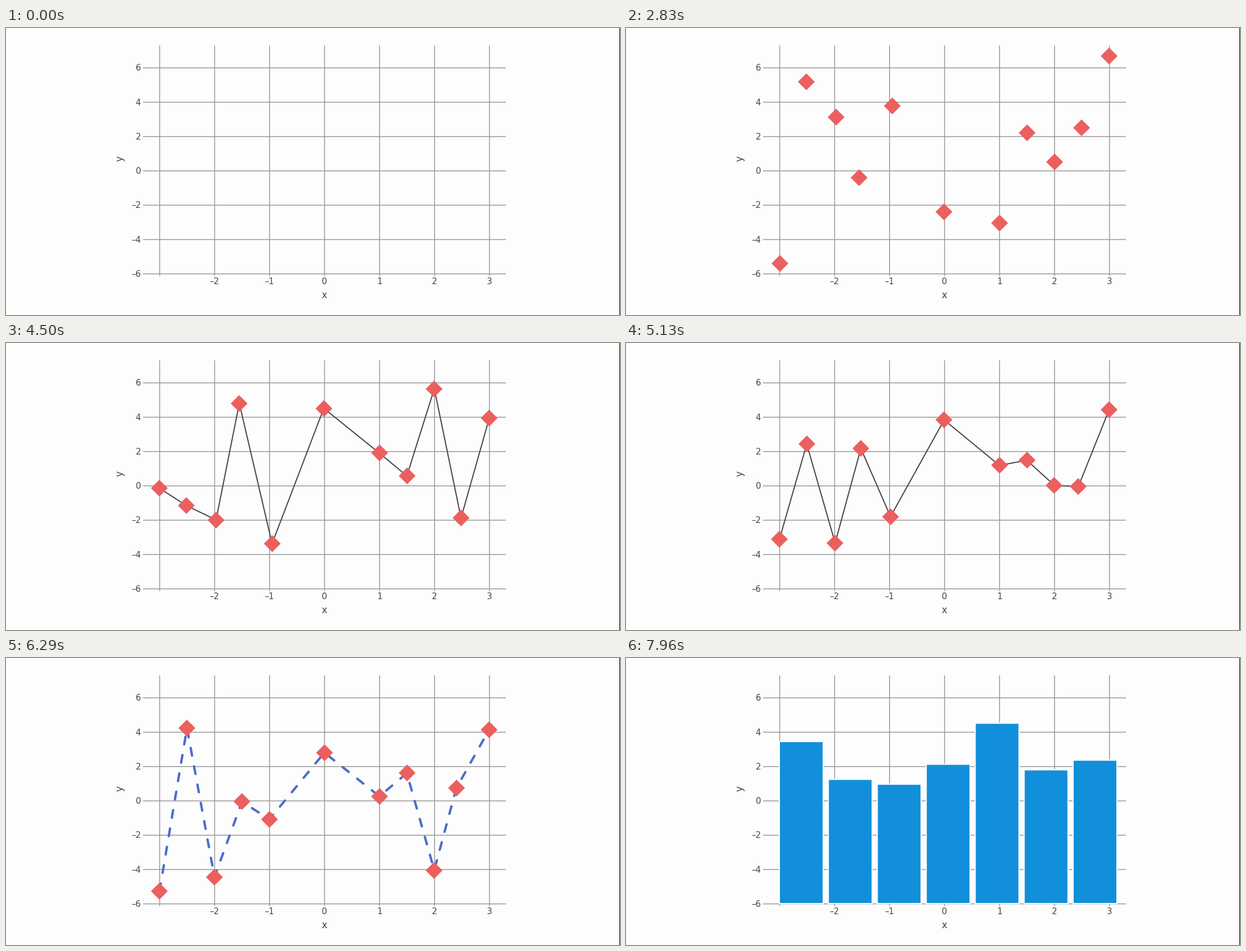
These frames come from a looping animation (1093x512 px, 8 s). A matplotlib script:

```python
import matplotlib.pyplot as plt
import numpy as np
from matplotlib.animation import FuncAnimation
from matplotlib.patches import Rectangle

W, H, DPI = 1093, 512, 64
PX = 72 / DPI                       # one pixel in points
LOOP, STEP = 8000, 40

BACK, GRID, INK = "#fdfdfd", "#979797", "#454545"
RED, BLUE, BAR = "#ec5f5f", "#4c6dc9", "#128fda"

# Stage changes in ms
DOTS_ON, DIAMONDS_ON, LINE_ON, DASHES_ON, BARS_ON = 400, 2200, 3600, 5900, 6500

plt.rcParams["font.family"] = "DejaVu Sans"
plt.rcParams["lines.scale_dashes"] = False


def sx(x):
    return 566.8 + 97.85 * x


def sy(y):
    return 254.6 - 30.62 * y


# Half steps from -3 to 3 without the two next to zero
base = np.arange(-3, 3.1, 0.5)
base = base[np.abs(base) != 0.5]
zigzag = 0.06 * (-1) ** np.arange(11) * np.exp(-(base + 1.25) ** 2)
dent = -0.1 * np.exp(-(4 * (base - 2.5)) ** 2)


def point_x(t):
    p = np.clip((t - 4300) / 1260, 0, 1)
    return base + (1 - p) * zigzag + p * dent


# Key poses of the random heights; the first is seeded, the last sags from the one before
pose_times = [DOTS_ON, 1600, 2800, 4480, 5560, 6280]
poses = [
    np.random.default_rng(4).uniform(-4, 5, 11),
    [-2.19, -3.22, -5.10, 5.42, 4.10, 0.78, -4.22, 2.21, 2.24, -0.02, 3.92],
    [-5.39, 5.18, 3.12, -0.39, 3.79, -2.40, -3.06, 2.21, 0.51, 2.50, 6.67],
    [-0.15, -1.16, -1.99, 4.80, -3.37, 4.51, 1.90, 0.57, 5.65, -1.88, 3.94],
    [-5.13, 4.89, -4.26, 0.36, -0.72, 3.37, 0.69, 2.11, -3.84, 1.19, 4.79],
]
poses.append(0.95 * np.array(poses[-1]) - 0.4)


def point_y(t):
    return np.array([np.interp(t, pose_times, track) for track in zip(*poses)])


def bar_tops(t):
    """Three waves that drift along the seven bars and meet at the end."""
    angle = 2 * np.pi * np.arange(7) / 7 + 0.5 * (t - LOOP + STEP) / 1000
    waves = [(0.82, 1.89), (1.27, -0.26), (0.63, 1.37)]
    return 2.35 + sum(amp * np.cos(k * angle + phase)
                      for k, (amp, phase) in enumerate(waves, 1))


fig = plt.figure(figsize=(W / DPI, H / DPI), dpi=DPI, facecolor=BACK)
ax = fig.add_axes([0, 0, 1, 1])
ax.set_xlim(0, W)
ax.set_ylim(H, 0)
ax.axis("off")


def rule(xs, ys, color=GRID, width=1.5):
    ax.plot(xs, ys, color=color, lw=width * PX, zorder=1,
            solid_capstyle="butt", snap=False)


def label(x, y, text, size=15, **style):
    ax.text(x, y, text, size=size * PX, color=INK, va="baseline", **style)


def tick(n):
    return f"–{-n}" if n < 0 else str(n)


for n in range(-3, 4):
    rule([sx(n) + 0.3] * 2, [31, 442.5])
    if n > -3:
        label(sx(n), 457.2, tick(n), ha="center")
for n in range(-6, 7, 2):
    rule([244, 890], [sy(n) + 0.3] * 2)
    label(240.3, sy(n) + 5.6, tick(n), ha="right")
label(566.8, 482.5, "x", 17, ha="center")
label(207.5, 233.5, "y", 17, ha="center", rotation=90, rotation_mode="anchor")
rule([W - 0.5] * 2, [0, H], "black", 1)

line, = ax.plot([], [], color=INK, lw=2 * PX, zorder=2)
dashes, = ax.plot([], [], color=BLUE, lw=4.2 * PX, zorder=2,
                  dashes=(14 * PX, 19.2 * PX), dash_capstyle="round")
dots, = ax.plot([], [], "o", color=INK, ms=8.6 * PX, mew=0, zorder=3)
# Marker "D" is a turned square, so its side is the diagonal over root two
diamonds, = ax.plot([], [], "D", color=RED, ms=29.5 / 2**0.5 * PX, mew=0, zorder=3)
bars = [ax.add_patch(Rectangle((273 + 87.15 * i, 438), 78, 0, fc=BAR, ec="white",
                               lw=2 * PX, zorder=2, snap=False))
        for i in range(7)]


def draw(i):
    t = i * STEP
    xs, ys = sx(point_x(t)), sy(point_y(t))
    for art in (line, dashes, dots, diamonds):
        art.set_data(xs, ys)
    dots.set_visible(DOTS_ON <= t < DIAMONDS_ON)
    diamonds.set_visible(DIAMONDS_ON <= t < BARS_ON)
    line.set_visible(LINE_ON <= t < DASHES_ON)
    dashes.set_visible(DASHES_ON <= t < BARS_ON)
    for bar, top in zip(bars, sy(bar_tops(t))):
        bar.set_visible(t >= BARS_ON)
        bar.set_height(top - 438)
    return [line, dashes, dots, diamonds, *bars]


anim = FuncAnimation(fig, draw, frames=LOOP // STEP, interval=STEP,
                     init_func=lambda: draw(0), repeat=True, repeat_delay=0)
plt.show()
```
